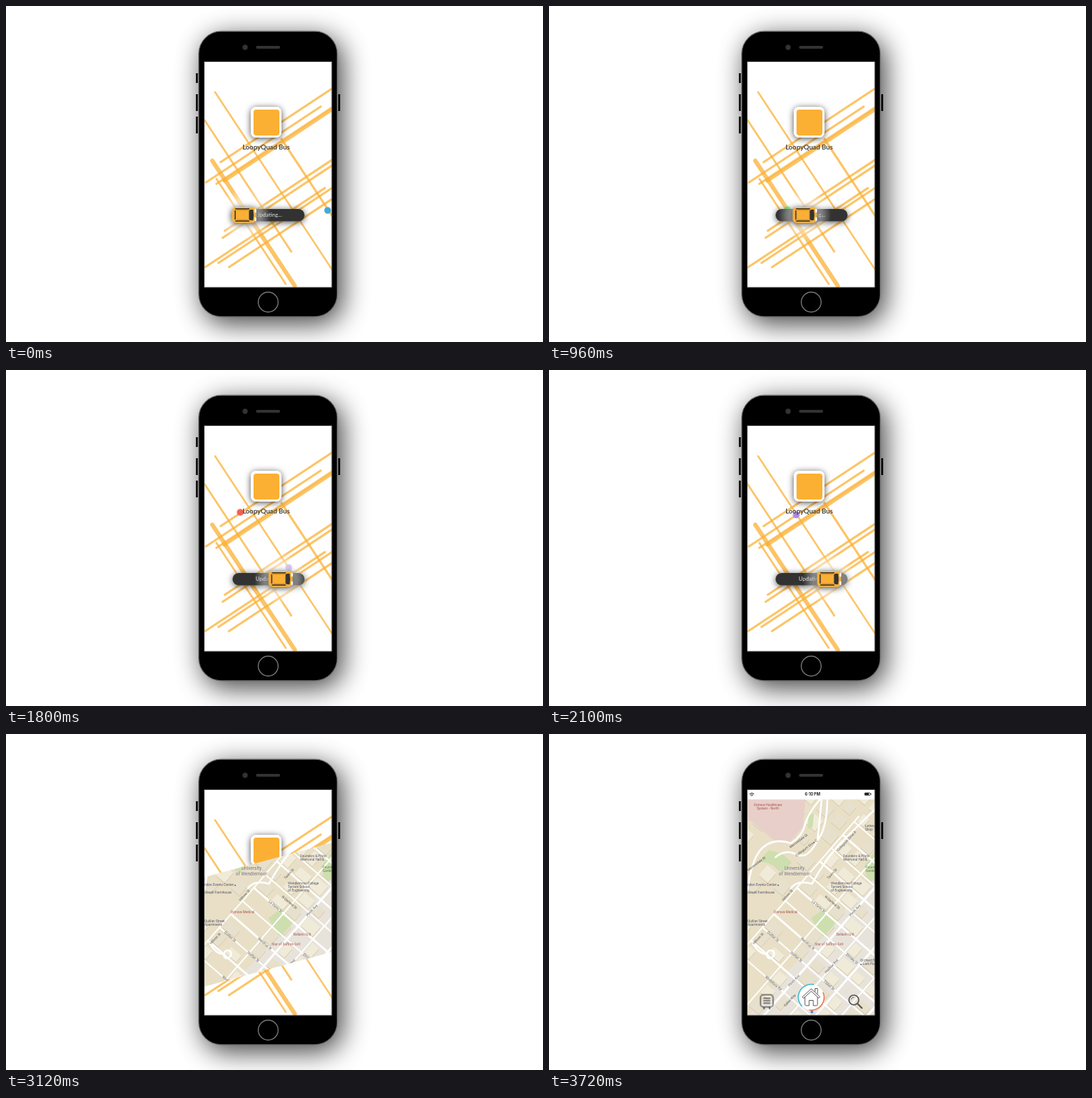
An HTML page for the animation above (5.37 s loop, 768 by 480 pixels).

```html
<!DOCTYPE html>
<html lang="en">
<head>
<meta charset="utf-8">
<title>Campus bus app</title>
<style>
html, body { margin: 0; width: 100%; height: 100%; overflow: hidden; background: #fff; }
#stage { position: relative; width: 768px; height: 480px; overflow: hidden; }
svg { display: block; }
#map { position: absolute; left: 284px; top: 80px; width: 182px; height: 322px; opacity: 0; }
text { font-family: Lato, sans-serif; }
#map text { font: 4.8px Roboto, sans-serif; }
#curves path, #grid line { fill: none; stroke: #fff; stroke-linecap: round; }
.line { fill: none; stroke: #555; stroke-linecap: round; stroke-linejoin: round; }
</style>
</head>
<body>
<div id="stage">
<svg width="768" height="480" viewBox="0 0 768 480">
  <defs>
    <filter id="soft" x="-50%" y="-50%" width="200%" height="200%"><feGaussianBlur stdDeviation="19"/></filter>
    <filter id="lift" x="-50%" y="-100%" width="200%" height="300%">
      <feDropShadow dx="0" dy="1.500" stdDeviation="5" flood-opacity=".7"/>
    </filter>
    <radialGradient id="halo">
      <stop offset=".35" stop-color="#fff" stop-opacity=".72"/>
      <stop offset="1" stop-color="#fff" stop-opacity="0"/>
    </radialGradient>
    <clipPath id="screen"><path d="M284 80h182v322h-182z"/></clipPath>
  </defs>

  <rect x="281" y="44" width="200" height="410" rx="34" opacity=".75" filter="url(#soft)"/>
  <path d="M273 96v14M273 126v24M273 158v24M476.500 126v24" stroke="#000" stroke-width="2.600"/>
  <rect x="275.700" y="36.200" width="198" height="407.600" rx="32" stroke="#6a6a6a" stroke-width="1.200"/>
  <circle cx="342" cy="59" r="3.700" fill="#333"/>
  <rect x="357.500" y="57" width="34.500" height="4" rx="2" fill="#333"/>
  <circle cx="375" cy="423" r="14.200" fill="none" stroke="#777" stroke-width="1.400"/>
  <path d="M284 80h182v322h-182z" fill="#fff"/>

  <g clip-path="url(#screen)">
    <g id="streets" stroke="#fbb034" stroke-opacity=".75" stroke-linecap="round"></g>
    <g id="dots"></g>
    <rect x="350" y="144" width="44" height="44" rx="8" fill="#fff" filter="url(#lift)"/>
    <rect x="354" y="148" width="37" height="37" rx="4" fill="#fbb034"/>
    <text x="372" y="204.500" text-anchor="middle" font-size="9.600" font-weight="700" fill="#444">LoopyQuad Bus</text>
    <rect x="324" y="290" width="103" height="17.500" rx="8.750" fill="#333" filter="url(#lift)"/>
    <circle id="glow" cx="340.500" cy="298.500" r="38" fill="url(#halo)"/>
    <g font-size="8" fill="#e4e4e4">
      <text id="busy" x="357" y="301">Updating...</text>
      <text id="done" x="352" y="301">Complete!</text>
    </g>
    <g id="car">
      <g transform="translate(323.500 287.500)">
        <rect id="body" width="34" height="22" rx="5" fill="#fbb034" filter="url(#lift)"/>
        <path d="M5 2.200h19M5 19.800h19M4.200 5v12" stroke="#2b2b2b" stroke-width="1.500" stroke-linecap="round"/>
        <path d="M6 4.200h17M6 17.800h17" stroke="#000" stroke-opacity=".3" stroke-width=".7"/>
        <path d="M24 4.500Q27 2.500 30 3.500Q31.500 11 30 18.500Q27 19.500 24 17.500Z" fill="#333"/>
        <path d="M33.300 3.500v3M33.300 15.500v3" stroke="#fff" stroke-width="2.400" stroke-linecap="round"/>
      </g>
    </g>
  </g>
</svg>

<div id="map">
<svg width="182" height="322" viewBox="284 80 182 322">
  <path d="M284 80h182v322h-182z" fill="#e8dfc6"/>
  <path d="M466 205L284 402H466Z" fill="#e8e3da"/>
  <g id="blocks" transform="translate(349 354) rotate(-49)"></g>
  <path d="M284 93h83l-4 40-20 23-20-3-39-33z" fill="#e9cfca"/>
  <g fill="#cddfae">
    <path d="M301 182l13-16q22 3 33 18l-12 14q-14-14-34-16z"/>
    <path d="M466 168l-16 22 6 16 10 4z"/>
    <path d="M375 263l19-14 18 19-20 22z"/>
    <path d="M371 116l8-3-2 20-7 3z"/>
  </g>
  <g id="grid" transform="translate(349 354) rotate(-49)"></g>
  <g id="curves" stroke-width="2.600">
    <path d="M284 222Q290 176 306 162T346 156Q362 146 366 130T388 93"/>
    <path d="M324 176Q338 164 354 172T384 152L390 93M384 152Q398 134 398 93"/>
    <path d="M346 220Q356 208 376 214Q394 182 410 164T466 108"/>
    <path d="M292 300Q302 316 312 314a5 5 0 1 1 8 4a4 4 0 1 1-8-4"/>
  </g>
  <g id="labels"></g>
  <circle cx="376" cy="397" r="2" fill="#4a85e8"/>

  <path d="M284 80h182v13.500h-182z" fill="#fff"/>
  <g class="line" style="stroke:#222"><path d="M287 85.500q3-2.600 6 0M288.300 87.200q1.700-1.400 3.400 0M290 88.600v.1"/></g>
  <text x="377" y="88.300" text-anchor="middle" style="font:700 5.600px Inter,sans-serif" fill="#222">6:10 PM</text>
  <rect x="451.500" y="84" width="8" height="3.600" rx=".8" fill="#222" stroke="#222" stroke-width=".6"/>
  <path d="M457.500 84.600h1.600v2.400h-1.600z" fill="#fff"/><path d="M460.800 85v1.600" stroke="#222"/>

  <g transform="translate(311.500 381.500)"><g id="menu">
    <rect class="line" x="-9" y="-9" width="18" height="17.500" rx="4" stroke-width="1.500"/>
    <path class="line" d="M-4.500-4h9M-4.500-.5h9M-4.500 3h9" stroke-width="1.300"/>
    <path class="line" d="M-4 10v.5M4 10v.5" stroke-width="2.400"/>
  </g></g>
  <g transform="translate(375 376)"><g id="home">
    <circle r="18.500" fill="#fff"/>
    <path d="M-13 13A18.400 18.400 0 0 1 4-18" fill="none" stroke="#45b8cc" stroke-width="1.600"/>
    <path d="M17-7A18.400 18.400 0 0 1-3 18.200" fill="none" stroke="#f4734a" stroke-width="1.600"/>
    <path class="line" d="M-9 0V10.500Q-9 12-7.500 12H-3V4.500H3V12H7.500Q9 12 9 10.500V0M-12.500-.5L0-12L12.500-.5L10.800 1.300L0-8.500L-10.800 1.300ZM5.500-8V-12.500H9V-5"/>
  </g></g>
  <g transform="translate(438 382)"><g id="search">
    <circle class="line" cx="-2" cy="-2" r="7" stroke-width="1.700"/>
    <path class="line" d="M-6-3q1-3 4-3" stroke-width=".9"/>
    <path class="line" d="M3.500 3.500L9.500 9.500" stroke-width="2.300"/>
  </g></g>
</svg>
</div>
<svg width="768" height="480" style="position:absolute;left:0;top:0">
  <path d="M283.500 79.500h182.500v322.500h-182.500z" fill="none" stroke="#555"/>
</svg>
</div>

<script>
const LOOP = 5370;
const $ = id => document.getElementById(id);

function add(parent, tag, attrs, text = '') {
  const el = document.createElementNS('http://www.w3.org/2000/svg', tag);
  for (const name in attrs) el.setAttribute(name, attrs[name]);
  el.textContent = text;
  return $(parent).appendChild(el);
}

// steps: [ms, properties]; the first and last poses are held
function play(el, steps) {
  const frames = steps.map(([ms, pose]) => ({ ...pose, offset: ms / LOOP }));
  frames.unshift({ ...steps[0][1], offset: 0 });
  frames.push({ ...steps[steps.length - 1][1], offset: 1 });
  el.animate(frames, { duration: LOOP, iterations: Infinity });
}

// Splash streets: two parallel families, each street given by its left end and run
function street(slope, x, y, run, width = 3.2) {
  add('streets', 'line', { x1: x, y1: y, x2: x + run, y2: y + run * slope, 'stroke-width': width });
}
const UP = -.66, DOWN = 1.515;
street(UP, 286, 252, 164);
street(UP, 312, 250, 170, 4.6);
street(UP, 285, 373, 171);
for (const [x, y] of [[307, 223], [301, 254], [313, 321], [310, 331], [304, 367], [319, 373]]) street(UP, x, y, 170);
street(DOWN, 299, 123, 170, 2.6);
street(DOWN, 284, 163, 124, 2.8);
street(DOWN, 295, 221, 118, 6);
street(DOWN, 301, 247, 99, 2.8);
street(DOWN, 394, 190, 80);

// Dots cross the screen at constant speed, fading at the ends of the trip
function dot(fill, start, end, [x1, y1], [x2, y2], firstOpacity = 0) {
  const at = (p, opacity) => [start + (end - start) * p,
    { transform: `translate(${x1 + (x2 - x1) * p}px, ${y1 + (y2 - y1) * p}px)`, opacity }];
  play(add('dots', 'circle', { r: 4.8, fill }), [at(0, firstOpacity), at(.22, 1), at(.92, 1), at(1, 0)]);
}
dot('#45a9d4', 340, 870, [460, 292], [390, 183], 1);
dot('#53e83a', 680, 1390, [296, 222], [410, 396]);
dot('#f4614d', 1140, 1910, [474, 108], [312, 219], 1);
dot('#a98be8', 1655, 2400, [429, 319], [303, 132]);

const drive = [
  [330, { transform: 'translateX(0)', easing: 'cubic-bezier(.333, .45, .667, .783)' }],
  [2430, { transform: 'translateX(67.5px)' }]
];
play($('car'), drive);
play($('glow'), drive);
play($('body'), [[2280, { fill: '#fbb034' }], [2400, { fill: '#62e833' }]]);
play($('busy'), [[2250, { opacity: 1 }], [2310, { opacity: 0 }]]);
play($('done'), [[2310, { opacity: 0 }], [2400, { opacity: 1 }]]);

// City grid: streets run across (v), avenues along (u), in a rotated frame
const CELL_U = 25, CELL_V = 28, U0 = -20;
const random = n => { const s = Math.sin(n * 12.9898) * 43758.5453; return s - Math.floor(s); };

for (let i = -5; i < 13; i++) {
  for (let j = -8; j < 5; j++) {
    const seed = i * 31 + j * 7;
    if (random(seed) < .22) continue;
    const x = U0 + i * CELL_U + 3, y = j * CELL_V + 3;
    const width = 11 + random(seed + 500) * 8, height = 10 + random(seed + 900) * 12;
    add('blocks', 'rect', { x: x - 1.2, y: y + 1, width, height, fill: '#dacfb3' });
    add('blocks', 'rect', { x, y, width, height, fill: random(seed + 70) < .6 ? '#f0ebd8' : '#e7e0cc' });
  }
}
const road = (x1, y1, x2, y2, width) => add('grid', 'line', { x1, y1, x2, y2, 'stroke-width': width });
for (let i = 0; i < 11; i++) road(U0 + i * CELL_U, -84, U0 + i * CELL_U, 130, i % 2 ? 2.8 : 2);
for (let j = -3; j < 5; j++) if (j !== -2) road(-70, j * CELL_V, 240, j * CELL_V, j % 2 ? 2 : 3);

function label(text, x, y, fill, anchor = 'middle', transform = '', style = '') {
  add('labels', 'text', { x, y, fill, 'text-anchor': anchor, transform, style }, text);
}
const roadLabel = (text, u, v, turn) =>
  label(text, 0, 1.5, '#4d4d4d', 'middle', `translate(349 354) rotate(-49) translate(${u} ${v}) rotate(${turn})`);

// Cross streets: name, grid column, v
[
  ['Wintlebury Rd', 0, -20], ['Quillan St', 2, -64], ['Quillan St', 2, -20], ['Wendrup St', 3, -20],
  ['Tibbet St', 2, 42], ['Elmsey St', 4, 42], ['La Vanto St', 5, -43], ['N Garlend St', 5.7, -32]
].forEach(([name, column, v]) => roadLabel(name, U0 + column * CELL_U, v, 90));
// Avenues: name, u, v
[
  ['Plinth Ave', 2, 0], ['Plinth Ave', 135, 0], ['Hadlow Ave', 53, 27], ['Osker Way', -23, 14], ['Hillrow St', 14, -78],
  ['Hillrow St', 88, -87], ['Tavrin St', 153, -59], ['Collegium Drive A', 202, -74], ['Collegium Drive C', 157, -111],
  ['Merrowdale St', 157, -126], ['Merrowdale St', 93, -150]
].forEach(([name, u, v]) => roadLabel(name, u, v, v < -100 ? 12 : 2));

function place(x, y, fill, lines, anchor = 'start') {
  lines.split('|').forEach((text, i) => label(text, x, y + i * 5, fill, anchor));
}
const INK = '#555566', RED = '#a8554f';
place(313, 102.5, RED, 'Ostrava Healthcare|System - North', 'middle');
place(284, 217, INK, 'ndon Events Center ▴');
place(284, 228, INK, 'ckwell Farmhouse');
place(321, 255.5, RED, 'Ostrava Medical');
place(284, 269, INK, 'Quillan Street|Apartments');
place(403, 214.5, INK, 'Wendlemoor College|Tarrant School|of Engineering');
place(421, 175.5, INK, 'Founders & Pilots|Memorial Hall &');
place(453, 192, '#64794d', 'Founders|Garden');
place(411, 287.5, RED, 'Bellanti Grill');
place(380, 301.5, RED, 'Star of Saffron Grill');
place(452, 132.5, INK, 'Lettery|Shop');
place(445, 324.5, INK, 'Orchard Bakes|▴ Lark Play');
['University', 'of Wendlemoor'].forEach((text, i) =>
  label(text, 351, 193.5 + i * 8, '#777790', 'middle', '', 'font-size:6.6px'));

// Rotated rectangle that uncovers the map
function tilt(cy, w, h, degrees) {
  const a = degrees * Math.PI / 180, c = Math.cos(a), s = Math.sin(a);
  const corners = [[-1, -1], [1, -1], [1, 1], [-1, 1]].map(([i, j]) => {
    const x = i * w / 2, y = j * h / 2;
    return `${(91 + x * c - y * s).toFixed(2)}px ${(cy + x * s + y * c).toFixed(2)}px`;
  });
  return `polygon(${corners.join(',')})`;
}
play($('map'), [
  [2999, { opacity: 0, clipPath: tilt(218, 103, 18, 0) }],
  [3000, { opacity: 1, clipPath: tilt(218, 103, 18, 0) }],
  [3120, { opacity: 1, clipPath: tilt(178, 300, 150, -15) }],
  [3510, { opacity: 1, clipPath: tilt(161, 540, 540, -45) }]
]);

const pop = (id, steps) => play($(id), steps.map(([ms, k]) => [ms, { transform: `scale(${k})` }]));
pop('menu', [[3390, 0], [3510, 1]]);
pop('home', [[3450, 0], [3590, 1.4], [3690, 1]]);
pop('search', [[3570, 0], [3720, 1]]);
</script>
</body>
</html>
```
